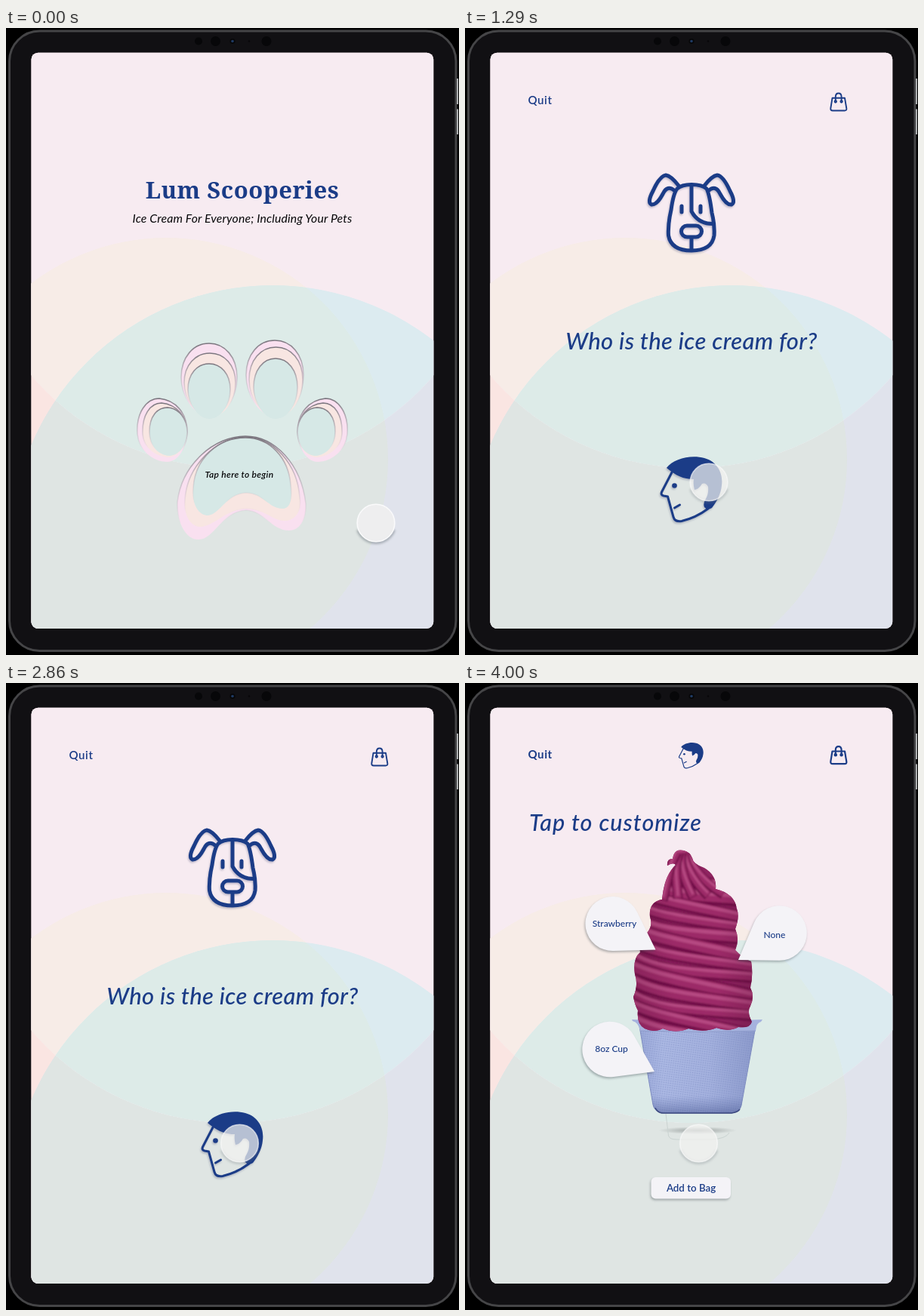
Recreate the animation shown at these times as an HTML page. Size 600x831 px, loop 4.14 s.

```html
<!DOCTYPE html>
<html lang="en">
<head>
<meta charset="utf-8">
<title>Ice cream kiosk</title>
<style>
  html, body { margin: 0; width: 100%; height: 100%; overflow: hidden; background: #000; }
  svg { display: block; width: 100vw; height: 100vh; }
  text { font-family: Lato, "Open Sans", sans-serif; fill: #1b3c87; }
  .it { font-style: italic; }
  .mid { text-anchor: middle; }
  .line { fill: none; stroke: #1b3c87; stroke-linecap: round; stroke-linejoin: round; }
  .ink { fill: #1b3c87; }
  .card { fill: #f4f3f7; filter: drop-shadow(-1px 2px 1.5px rgba(60, 70, 80, .38)); }
  .soft { filter: drop-shadow(-1px 2px 1px rgba(60, 70, 110, .28)); }
  .label { font-size: 12px; font-weight: 500; text-anchor: middle; }
  .disc { fill: #efeff0; fill-opacity: .96; stroke: #fafafb; stroke-width: 1.6; }
  .under { fill: none; stroke: #6e7880; stroke-width: 4; opacity: .5; }
  .down .disc { fill: #f3f3f2; fill-opacity: .72; stroke-opacity: .65; }
  .down .under { opacity: .28; }
</style>
</head>
<body>
<svg viewBox="0 0 600 831" preserveAspectRatio="none">
  <defs>
    <clipPath id="screen"><rect x="33.500" y="32.700" width="532.700" height="763.300" rx="9"/></clipPath>
    <clipPath id="pinkClip"><circle cx="300" cy="232" r="351"/></clipPath>
    <clipPath id="creamClip"><circle cx="212" cy="572" r="294"/></clipPath>
    <clipPath id="swirlClip"><path d="M290 222C277 219 276 229 275 233Q267 233 268 242Q276 237 279 241
      C266 254 263 270 261 287Q243 290 245 310Q249 321 242 330Q230 342 232 357Q222 365 225 386Q230 400 223 416
      Q225 427 229 434Q227 452 238 458Q250 464 262 458Q280 465 296 458Q317 464 333 457Q350 463 362 456Q378 458 380 449
      Q373 436 378 428Q384 415 378 404Q382 387 379 369Q368 365 358 354Q364 340 358 326Q364 310 360 299
      Q357 279 332 273Q334 255 317 245Q302 240 301 232Q298 224 290 222Z"/></clipPath>
    <linearGradient id="edge" x1="0" y1="0" x2="0" y2="1">
      <stop offset="0" stop-color="#7a757e"/>
      <stop offset=".4" stop-color="#a59ca6" stop-opacity=".55"/>
      <stop offset=".85" stop-color="#b9b0bb" stop-opacity="0"/>
    </linearGradient>
    <linearGradient id="shade">
      <stop offset="0" stop-color="#420728" stop-opacity=".2"/>
      <stop offset=".35" stop-color="#420728" stop-opacity="0"/>
      <stop offset=".7" stop-color="#420728" stop-opacity="0"/>
      <stop offset="1" stop-color="#420728" stop-opacity=".25"/>
    </linearGradient>
    <linearGradient id="cup">
      <stop offset="0" stop-color="#9aa8d8"/>
      <stop offset=".2" stop-color="#abb8e3"/>
      <stop offset=".6" stop-color="#a4b1de"/>
      <stop offset="1" stop-color="#8c9acb"/>
    </linearGradient>
    <linearGradient id="base" x1="0" y1="0" x2="0" y2="1">
      <stop offset=".8" stop-color="#5868a4" stop-opacity="0"/>
      <stop offset="1" stop-color="#47568f" stop-opacity=".5"/>
    </linearGradient>
    <pattern id="weave" width="3" height="3" patternUnits="userSpaceOnUse" patternTransform="rotate(8)">
      <circle cx="1.500" cy="1.500" r=".8" fill="#6f7fb8" opacity=".45"/>
    </pattern>
    <radialGradient id="floor">
      <stop offset="0" stop-color="#89908f" stop-opacity=".8"/>
      <stop offset="1" stop-color="#89908f" stop-opacity="0"/>
    </radialGradient>
    <filter id="blur"><feGaussianBlur stdDeviation="1"/></filter>
    <filter id="blurWide" x="-20%" y="-50%" width="140%" height="200%"><feGaussianBlur stdDeviation="1.600"/></filter>
    <g id="bag" class="line">
      <path d="M486.500 92.800H503L505.300 106.500Q505.800 109.500 502.800 109.500H487Q484 109.500 484.300 106.500Z"/>
      <path d="M490.800 96V91Q491 86.500 494.700 86.500Q498.500 86.500 498.600 91V96"/>
      <circle cx="490.800" cy="97.500" r="1.200"/><circle cx="498.600" cy="97.500" r="1.200"/>
    </g>
    <g id="man">
      <path class="line" stroke-width="3" d="M275 587L260.500 615Q259 619 263 620L268.500 621L276 648Q278 655 287 653.500Q306 649 322 637"/>
      <path class="ink" d="M267 583C276 571 299 565 317 570C335 575 342 591 340 606C339 618 333 628 327 636
        Q321 640 317 635Q315 630 319 624Q323 617 322 608Q319 602 314 604Q310 611 304 612Q302 605 303 598C289 598 279 593 267 583Z"/>
      <circle class="ink" cx="277.500" cy="606.500" r="3.300"/>
      <path class="line" stroke-width="3" d="M277.500 636L284.500 632"/>
    </g>
    <path id="ear" d="M283 209Q273 196 266 195Q258 196 249 216Q241 231 247 234Q254 235 262 220Q268 207 278 216"/>
    <path id="tub" d="M231 455L249 559Q251 569 263 570H353Q364 569 366 560L385 455Z"/>
  </defs>

  <rect width="600" height="831"/>
  <rect x="4.500" y="4" width="591.500" height="821.500" rx="40" fill="#111013" stroke="#454547" stroke-width="3"/>
  <path d="M598 67V101M598 107.500V141" stroke="#aeb0b2" stroke-width="2"/>
  <g fill="#070709">
    <circle cx="255" cy="17.500" r="5"/><circle cx="277.500" cy="17.500" r="6.500"/>
    <circle cx="322" cy="17.500" r="1.200"/><circle cx="345" cy="17.500" r="6.500"/>
    <circle cx="300" cy="17.500" r="3.600"/><circle cx="300" cy="17.500" r="1.800" fill="#1f3a63"/>
  </g>

  <g clip-path="url(#screen)">
    <g id="backdrop"></g>

    <g class="page">
      <text class="mid" x="313" y="226" style="font:700 31px 'Noto Serif',serif;letter-spacing:.5px">Lum Scooperies</text>
      <text class="it mid" x="313" y="258" font-size="15.800" letter-spacing=".14" style="fill:#08080a">Ice Cream For Everyone; Including Your Pets</text>
      <g id="paw"></g>
      <text class="it mid" x="309" y="596" font-size="12" font-weight="600" letter-spacing=".3" style="fill:#08080a">Tap here to begin</text>
    </g>

    <g class="page">
      <text x="83.500" y="100.500" font-size="15" font-weight="600" letter-spacing=".6">Quit</text>
      <use href="#bag" stroke-width="1.900"/>
      <g class="line soft" stroke-width="5">
        <use href="#ear"/><use href="#ear" transform="matrix(-1 0 0 1 600 0)"/>
        <path d="M281 213Q287 207.500 300 207.500Q314 207.500 320 213Q324 221 327 245Q331 261 330 275Q327 295 300 295
          Q273 295 269.500 275Q268.500 261 273 241Q276 219 281 213Z"/>
        <path d="M300 208V243Q309 260 329 259.500M287 236V244M312 236V244M300 278V294"/>
        <rect x="286.500" y="262" width="27" height="15" rx="7.500"/>
      </g>
      <text class="it mid" x="300" y="425.500" font-size="31" font-weight="500" letter-spacing=".35">Who is the ice cream for?</text>
      <use href="#man" class="soft"/>
    </g>

    <g class="page">
      <text x="83.500" y="100" font-size="15" font-weight="700" letter-spacing=".6">Quit</text>
      <use href="#man" transform="translate(283 79) scale(.402 .395) translate(-259 -568)"/>
      <use href="#bag" y="-2.300" stroke-width="2.200"/>
      <text class="it" x="85" y="196" font-size="30.500" font-weight="500" letter-spacing="1">Tap to customize</text>
      <ellipse cx="308" cy="593" rx="52" ry="5" fill="url(#floor)"/>
      <path d="M266 571L269.500 600Q271 605 280 605H326Q346 604 350 596" fill="none" stroke="#cad3d1"/>
      <use href="#tub" fill="url(#cup)" stroke="#7f8dc0"/>
      <use href="#tub" fill="url(#weave)"/>
      <use href="#tub" fill="url(#base)"/>
      <path d="M252 563Q255 570 263 570H353Q361 569 364 565" fill="none" stroke="#3c4a80" stroke-width="1.500"/>
      <path d="M221 446Q308 450 394 446L392 449Q386 450 385 461Q308 464 232 461Q230 450 222 448Z" fill="#a5b2de"/>
      <path d="M232 461Q308 464 385 461" fill="none" stroke="#8e9ccb"/>
      <g clip-path="url(#swirlClip)">
        <rect x="215" y="215" width="175" height="250" fill="#8f2560"/>
        <g id="swirl" fill="none" filter="url(#blur)"></g>
        <rect x="220" y="215" width="165" height="250" fill="url(#shade)"/>
      </g>
      <g id="drops"></g>
      <rect class="card" x="246.500" y="655" width="105.500" height="28.500" rx="6"/>
      <text class="mid" x="299.500" y="674" font-size="13.300" font-weight="600">Add to Bag</text>
    </g>

    <g id="dot">
      <path class="under" d="M-24 9A25.500 25.500 0 0 0 24 9" filter="url(#blurWide)"/>
      <circle class="disc" r="24.800"/>
    </g>
  </g>
</svg>
<script>
const $ = id => document.getElementById(id);
const pages = [...document.querySelectorAll('.page')];

// Overlapping translucent discs, one flat colour per region
const discs = (none, cream, teal, both, clip) => {
  const big = 'cx="353" cy="688" r="347"';
  return `<g${clip ? ` clip-path="url(#${clip})"` : ''}>
    <rect width="600" height="831" fill="${none}"/>
    <circle cx="212" cy="572" r="294" fill="${cream}"/>
    <circle ${big} fill="${teal}"/>
    <circle ${big} fill="${both}" clip-path="url(#creamClip)"/></g>`;
};
$('backdrop').innerHTML =
  discs('#f7e2e8', '#fae5e2', '#e0e3ec', '#dfe5e3') +
  discs('#f7ebf1', '#f7ece7', '#dcebf0', '#ddebe8', 'pinkClip');

// Paw print: three stacked paper layers per pad
const layers = ['#f9e0f0', '#f8e6e2', '#d6e8e6'];
const egg = (l, t, r, b, m) => {
  const c = (l + r) / 2, k = (r - l) * .28;
  return `M${l} ${m}C${l} ${m - (m - t) * .6} ${c - k} ${t} ${c} ${t}S${r} ${m - (m - t) * .6} ${r} ${m}
    S${c + k} ${b} ${c} ${b}S${l} ${m + (b - m) * .45} ${l} ${m}Z`;
};
const pad = paths => paths.map((d, i) =>
  `<path d="${d}" fill="${layers[i]}" stroke="url(#edge)" stroke-width="1.6"/>`).join('');
const side = pad([
  'M174 538C172 510 186 491 203 491C224 493 240 510 240 535C240 548 232 575 213 575C195 575 176 560 174 538Z',
  'M181 538C180 513 191 497 206 497C226 499 240 515 240 536C239 553 230 568 215 569C198 568 182 556 181 538Z',
  'M190 535C190 515 200 503 214 503C229 504 240 518 240 536C239 552 231 566 216 567C201 566 190 553 190 535Z']);
$('paw').innerHTML = side + `<g transform="matrix(-1 0 0 1 626 0)">${side}</g>` +
  pad([egg(232, 418, 306, 515, 463), egg(236, 431, 304, 516, 470), egg(241, 445, 297, 518, 479)]) +
  pad([egg(318, 414, 394, 515, 460), egg(322, 423, 393, 516, 466), egg(328, 438, 386, 518, 476)]) +
  pad([
    'M317 541C276 541 233 578 227 628C226 655 238 678 255 678C276 678 285 641 318 639C342 640 352 666 375 666C390 666 398 650 397 630C391 578 356 541 317 541Z',
    'M317 542C279 542 240 580 237 625C235 646 245 663 260 661C280 657 290 639 318 637C342 637 355 655 372 653C388 650 391 635 389 622C386 578 354 542 317 542Z',
    'M317 543C282 543 250 570 248 610C246 630 254 646 268 646C284 644 292 617 318 616C340 616 348 637 366 637C378 637 379 622 377 605C374 570 350 543 317 543Z']);

// Soft-serve ridges
const ridge = (d, w) => [['#6f1047', w, 0], ['#9c2b67', w * .72, -1], ['#b64a82', w * .25, -4]]
  .map(([c, sw, dy]) => `<path d="${d}" stroke="${c}" stroke-width="${sw}" transform="translate(0 ${dy})"/>`).join('');
let ridges = '';
for (let i = 0; i < 14; i++) {
  const y = 232 + i * 17, bend = 7 * Math.sin(i * 2.1);
  ridges += ridge(`M210 ${y}C240 ${y + 30 + bend} 320 ${y + 32} 398 ${y + 46 - bend}`, 18 + 3 * Math.sin(i * 1.7));
}
for (let i = 4; i >= 0; i--) {
  ridges += ridge(`M${281 + i * 3} 224C${268 + i * 8} 246 ${268 + i * 13} 268 ${262 + i * 20} ${288 - i * 2}`, 13);
}
$('swirl').innerHTML = ridges;

// Label bubble: a disc joined to its tip by tangents
const drop = (cx, cy, r, px, py, tx, ty, label) => {
  const a = Math.atan2(py - cy, px - cx), b = Math.acos(r / Math.hypot(px - cx, py - cy));
  const at = q => `${(cx + r * Math.cos(q)).toFixed(1)} ${(cy + r * Math.sin(q)).toFixed(1)}`;
  return `<path class="card" d="M${px} ${py}L${at(a + b)}A${r} ${r} 0 1 1 ${at(a - b)}Z"/>
    <text class="label" x="${tx}" y="${ty}">${label}</text>`;
};
$('drops').innerHTML =
  drop(195.5, 319, 36, 252.5, 353.5, 198, 322.5, 'Strawberry') +
  drop(416.5, 331.5, 36.3, 362, 367, 410, 338, 'None') +
  drop(192, 485.5, 36.7, 251, 515, 194, 489, '8oz Cup');

// Pointer stops: step, x, y
const stops = [[0, 490, 656], [7, 323, 602], [12, 323, 602], [13, 322, 602], [17, 397, 508], [20, 309.5, 610], [29, 309.5, 610]];
const LOOP = 4140, STEP = 1000 / 7;

function render(ms) {
  const k = Math.min(28, Math.floor((ms % LOOP + 2.9) / STEP));
  const page = k < 9 ? 0 : k < 21 ? 1 : 2;
  pages.forEach((p, i) => p.style.display = i === page ? '' : 'none');
  const n = stops.findIndex(s => s[0] > k);
  const [k0, x0, y0] = stops[n - 1], [k1, x1, y1] = stops[n];
  const u = (k - k0) / (k1 - k0), e = u * u * (3 - 2 * u);
  $('dot').setAttribute('transform', `translate(${x0 + (x1 - x0) * e} ${y0 + (y1 - y0) * e})`);
  $('dot').classList.toggle('down', k >= 7 && k <= 13 || k >= 20);
}

const start = performance.now();
(function tick() {
  render(performance.now() - start);
  requestAnimationFrame(tick);
})();
</script>
</body>
</html>
```
